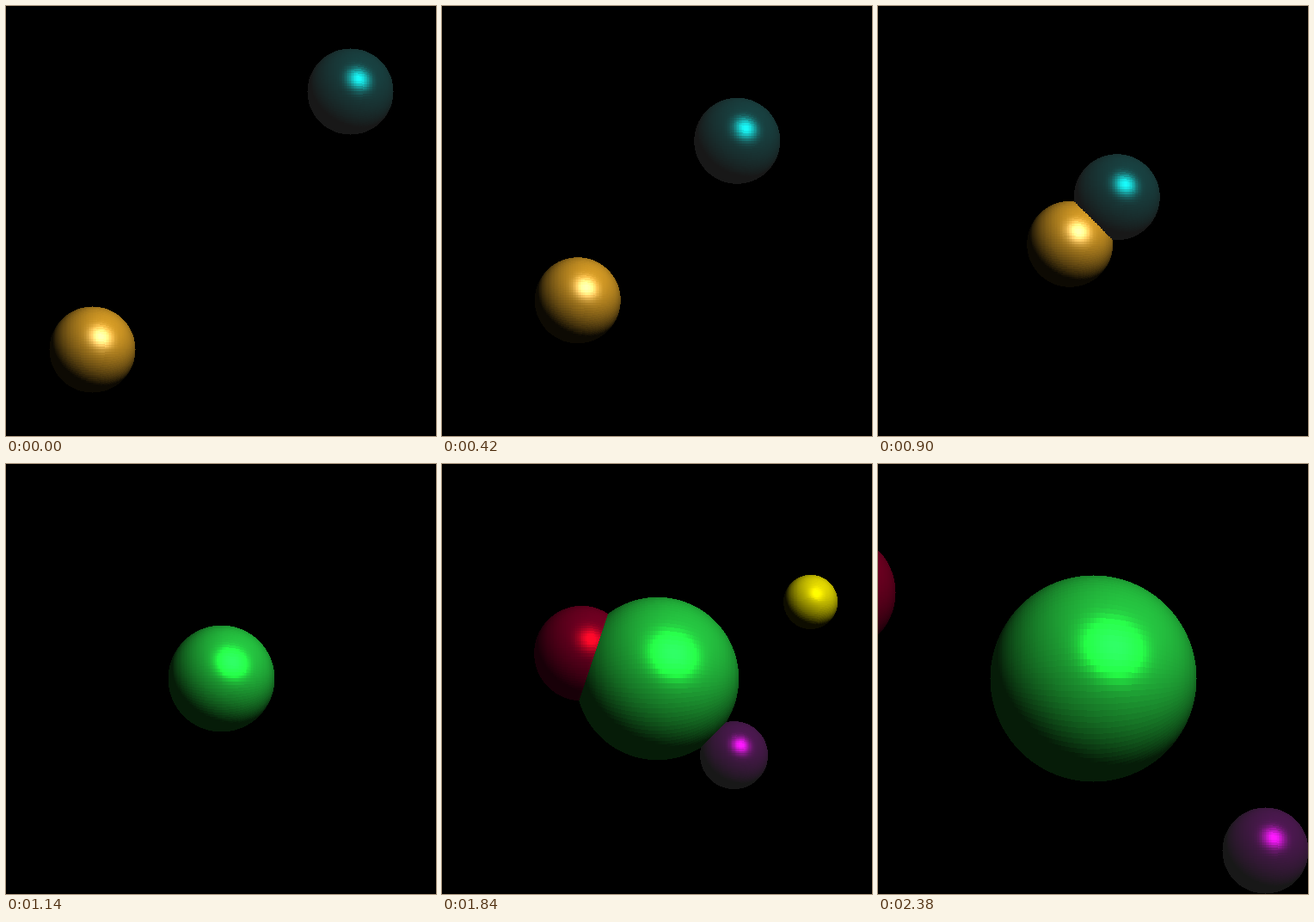
Animation, 500 px wide and 500 px high, one loop 2400 ms. Source, as an HTML page with a canvas:

```html
<!DOCTYPE html>
<html lang="en">
<head>
<meta charset="utf-8">
<title>Spheres</title>
<style>
  html, body { margin: 0; width: 100%; height: 100%; overflow: hidden; background: #000; }
  canvas { display: block; width: 500px; height: 500px; }
</style>
</head>
<body>
<canvas id="stage" width="500" height="500"></canvas>
<script>
const SIZE = 500, STEP = 20, COUNT = 120;
const FACETS = 100, SHINE = 8;
const ctx = document.getElementById('stage').getContext('2d');
const image = ctx.createImageData(SIZE, SIZE);
const pixels = new Uint32Array(image.data.buffer);
const depth = new Float32Array(SIZE * SIZE);
const BLACK = 0xff000000;

const lightLength = Math.hypot(0.5, 0.75, 1);
const light = [0.5, 0.75, 1].map(v => v / lightLength);

// One flat Phong colour per facet; the sphere's poles lie on the x axis.
function material(ambient, diffuse, specular) {
  const half = FACETS / 2;
  const table = new Uint32Array(FACETS * half);
  for (let j = 0; j < FACETS; j++) {
    const phi = (j + 0.5) * Math.PI / FACETS;
    for (let i = 0; i < half; i++) {
      const rot = (i + 0.5) * Math.PI / half;
      const nx = Math.cos(phi);
      const ny = Math.sin(phi) * Math.cos(rot);
      const nz = Math.sin(phi) * Math.sin(rot);
      const lit = Math.max(0, nx * light[0] + ny * light[1] + nz * light[2]);
      const gloss = lit ? Math.max(0, 2 * lit * nz - light[2]) ** SHINE : 0;
      const [r, g, b] = ambient.map((a, c) =>
        Math.min(255, Math.round(a + diffuse[c] * lit + specular[c] * gloss)));
      table[j * half + i] = (BLACK | b << 16 | g << 8 | r) >>> 0;
    }
  }
  return table;
}

const gold = material([13, 10, 3], [200, 145, 34], [150, 150, 150]);
const teal = material([24, 24, 24], [0, 42, 42], [0, 190, 190]);
const green = material([6, 28, 8], [32, 172, 58], [12, 255, 40]);
const yellow = material([14, 13, 0], [215, 205, 0], [60, 60, 0]);
const purple = material([24, 24, 24], [52, 0, 56], [190, 0, 190]);
const red = material([24, 0, 8], [90, 0, 26], [170, 10, 10]);

function sphere(cx, cy, r, table) {
  cy -= 1;
  const half = FACETS / 2;
  const x0 = Math.max(0, Math.ceil(cx - r)), x1 = Math.min(SIZE - 1, Math.floor(cx + r));
  const y0 = Math.max(0, Math.ceil(cy - r)), y1 = Math.min(SIZE - 1, Math.floor(cy + r));
  for (let y = y0; y <= y1; y++) {
    for (let x = x0; x <= x1; x++) {
      const dx = x - cx, dy = cy - y;
      const zz = r * r - dx * dx - dy * dy;
      if (zz < 0) continue;
      const z = Math.sqrt(zz), at = y * SIZE + x;
      if (z < depth[at]) continue;
      depth[at] = z;
      const j = Math.min(FACETS - 1, Math.floor(Math.acos(dx / r) / Math.PI * FACETS));
      const i = Math.min(half - 1, Math.floor(Math.atan2(z, dy) / Math.PI * half));
      pixels[at] = table[j * half + i];
    }
  }
}

const ramp = (n, from, to) => Math.min(1, Math.max(0, (n - from) / (to - from)));

function draw(n) {
  pixels.fill(BLACK);
  depth.fill(-1);
  if (n < 55) {
    const d = 150 * (1 - ramp(n, 0, 55));
    sphere(250 + d, 250 - d, 50, teal);
    sphere(250 - d, 250 + d, 50, gold);
  } else {
    const scale = 0.5 + 0.5 * ramp(n, 55, 119);
    const out = scale * ramp(n, 57, 119);
    const late = scale * ramp(n, 76, 119);
    sphere(250 + 200 * out, 250 + 200 * out, 50 * scale, purple);
    sphere(250 + 400 * out, 250 - 200 * out, 40 * scale, yellow);
    sphere(250 - 300 * late, 250 - 100 * late, 70 * scale, red);
    sphere(250, 250, 120 * scale, green);
  }
  ctx.putImageData(image, 0, 0);
}

const start = performance.now();
let shown = -1;
function tick() {
  const n = Math.floor((performance.now() - start) / STEP) % COUNT;
  if (n !== shown) draw(shown = n);
  requestAnimationFrame(tick);
}
tick();
</script>
</body>
</html>
```
